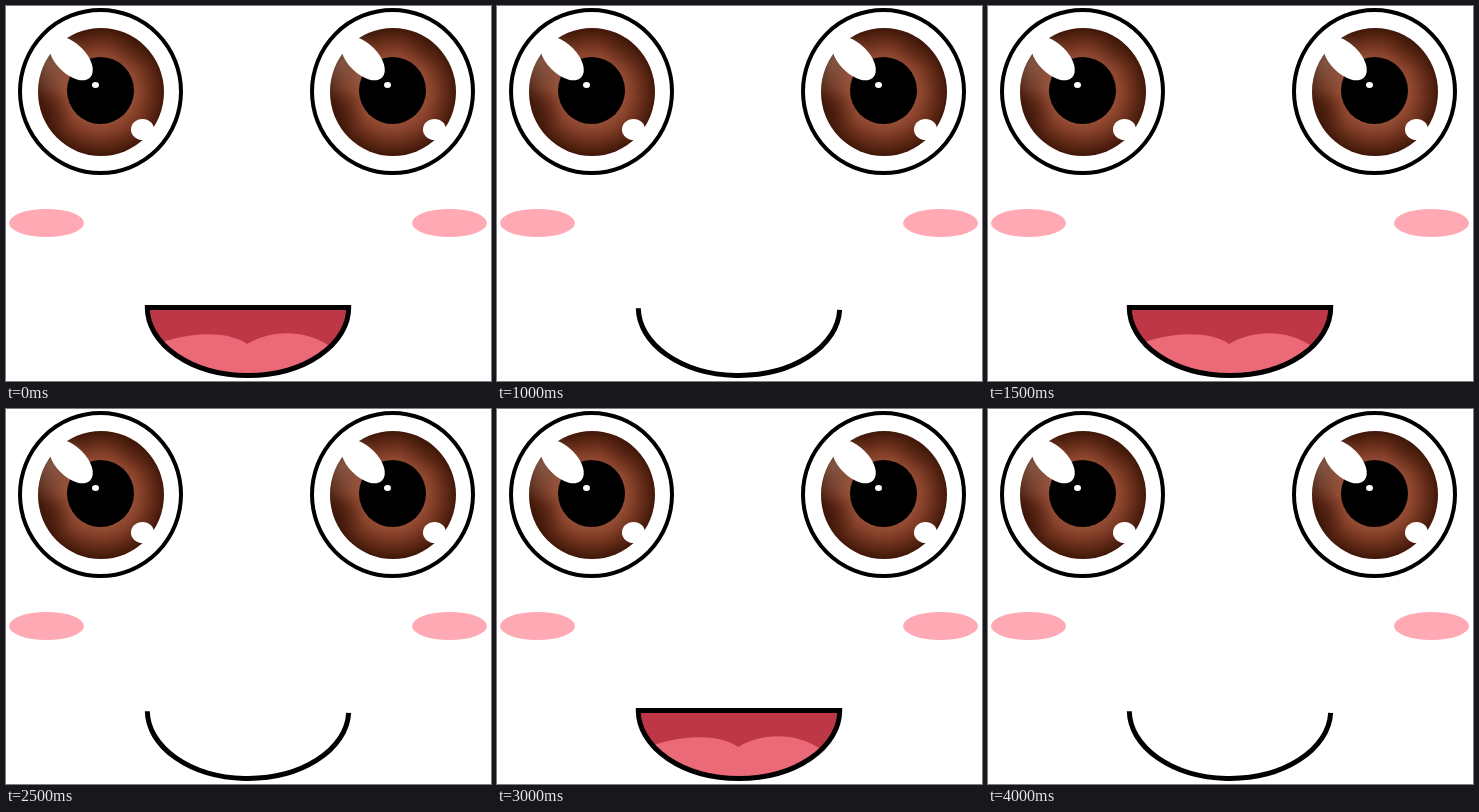
An HTML page with a canvas for the animation above (4500 ms loop, 485 by 375 pixels).

```html
<!DOCTYPE html>
<html lang="en">
<head>
<meta charset="utf-8">
<title>Talking face</title>
<style>
  html, body { margin: 0; width: 100%; height: 100%; overflow: hidden; background: #fff; }
  canvas { display: block; }
</style>
</head>
<body>
<canvas id="stage" width="485" height="375"></canvas>
<script>
const ctx = document.getElementById('stage').getContext('2d');
const CYCLE = 1500, OPEN_TIME = 1000;

function oval(x, y, rx, ry, fill, turn = 0) {
  ctx.beginPath();
  ctx.ellipse(x, y, rx, ry, turn, 0, Math.PI * 2);
  ctx.fillStyle = fill;
  ctx.fill();
}

function radial(x, y, r0, r1, stops) {
  const g = ctx.createRadialGradient(x, y, r0, x, y, r1);
  stops.forEach(([at, color]) => g.addColorStop(at, color));
  return g;
}

function glow(x, y, r, rgb, alpha) {
  ctx.fillStyle = radial(x, y, 0, r, [[0, `rgba(${rgb},${alpha})`], [1, `rgba(${rgb},0)`]]);
  ctx.fillRect(x - r, y - r, r * 2, r * 2);
}

function iris() {
  ctx.save();
  oval(95, 86, 63, 64, radial(95, 86, 30, 65, [
    [0, '#9a5038'], [0.3, '#854029'], [0.65, '#612a17'], [1, '#3d1507']
  ]));
  ctx.clip();
  glow(44, 56, 40, '165,120,100', 0.6);
  glow(44, 106, 24, '45,14,4', 0.4);
  glow(128, 40, 26, '50,16,5', 0.25);
  ctx.restore();
}

function eye(dx) {
  ctx.save();
  ctx.translate(dx, 0);
  oval(94.5, 85.5, 80.5, 81.5, '#fff');
  ctx.lineWidth = 4;
  ctx.strokeStyle = '#000';
  ctx.stroke();
  iris();
  oval(94.5, 84.5, 33.5, 33.5, '#000');
  oval(89.5, 79, 3.5, 3, '#fff');
  oval(65, 52.5, 27, 15, '#fff', Math.PI / 4);
  oval(136.5, 123.5, 11.5, 10.5, '#fff');
  ctx.restore();
}

function lips(start, end) {
  ctx.beginPath();
  ctx.ellipse(242, 301.5, 100.7, 68, 0, start, end);
}

function openMouth() {
  ctx.save();
  lips(0, Math.PI);
  ctx.fillStyle = '#be3746';
  ctx.fill();
  ctx.clip();
  ctx.beginPath();
  ctx.moveTo(150, 339);
  ctx.bezierCurveTo(176, 327, 220, 323, 241, 338);
  ctx.bezierCurveTo(265, 324, 297, 323, 322, 339);
  ctx.lineTo(340, 375);
  ctx.lineTo(150, 375);
  ctx.fillStyle = '#ec6a78';
  ctx.fill();
  ctx.restore();
  lips(0, Math.PI);
  ctx.closePath();
  ctx.stroke();
}

function draw(now) {
  ctx.fillStyle = '#fff';
  ctx.fillRect(0, 0, 485, 375);
  eye(0);
  eye(292);
  oval(40.5, 217, 37.5, 14, '#ffa9b5');
  oval(443.5, 217, 37.5, 14, '#ffa9b5');
  ctx.lineWidth = 5;
  ctx.strokeStyle = '#000';
  if (now % CYCLE < OPEN_TIME) {
    openMouth();
  } else {
    lips(0.035, Math.PI - 0.012);
    ctx.stroke();
  }
}

const begin = performance.now();
function tick() {
  draw(performance.now() - begin);
  requestAnimationFrame(tick);
}
tick();
</script>
</body>
</html>
```
